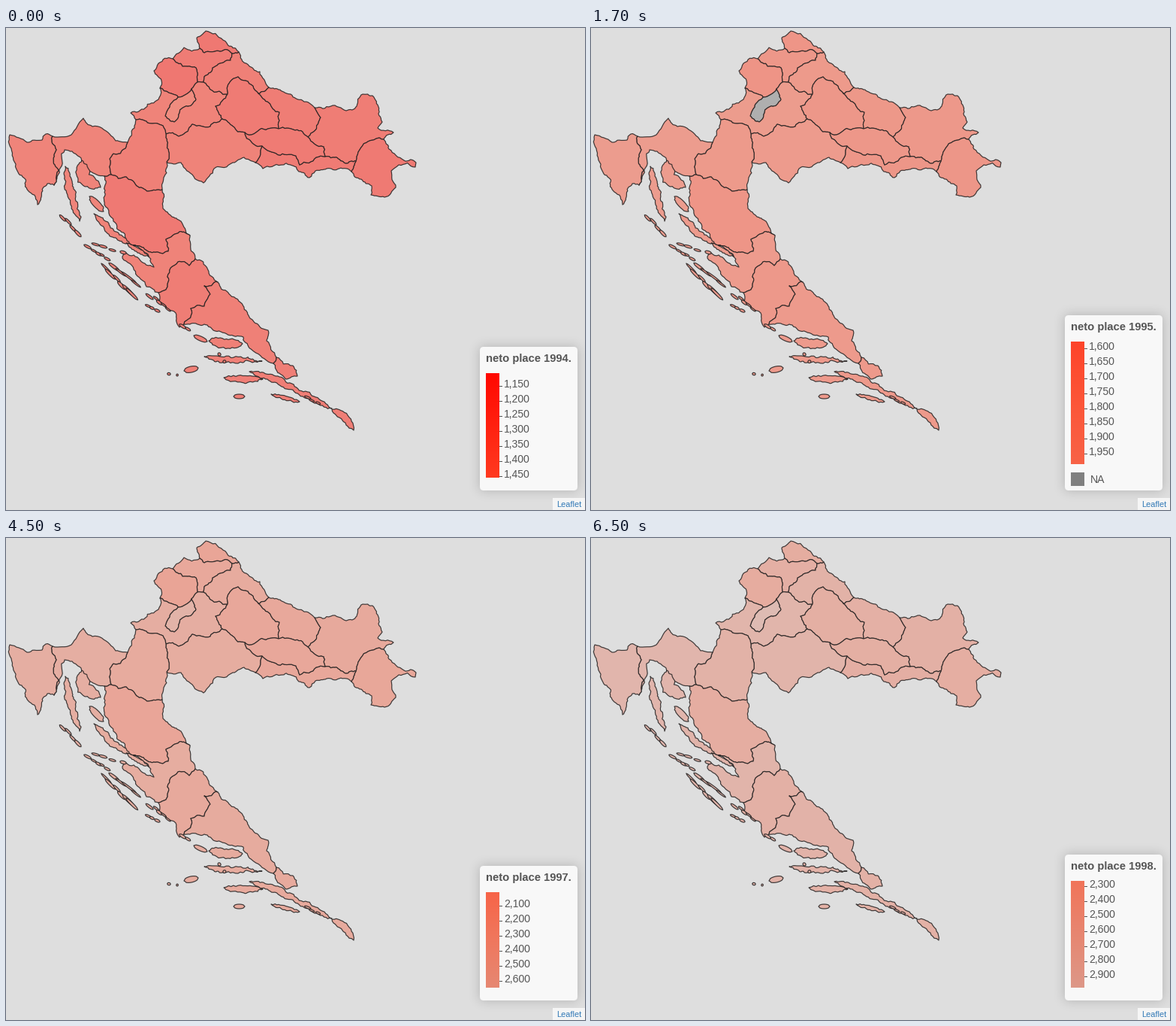
Write a matplotlib script that moves like this. It is 771 px wide and 641 px high and loops after 8 s.

```python
import math

import matplotlib.pyplot as plt
import numpy as np
from matplotlib.animation import FuncAnimation
from matplotlib.patches import FancyBboxPatch, Polygon, Rectangle

W, H, DPI = 771, 641, 128
PX = 72 / DPI  # one pixel in points
BG = np.array([222, 222, 222]) / 255
GRAY = np.array([128, 128, 128]) / 255
INK = "#555555"
EDGE = (0.13, 0.12, 0.12, 0.85)

plt.rcParams["font.family"] = "Liberation Sans"
plt.rcParams["text.kerning_factor"] = 6  # no pair kerning

# Points where county borders meet.
NODES = dict(
    A=(258, 27), B=(301, 34), C=(310, 32), D=(222, 41), E=(255, 72), F=(263, 72), G=(205, 80),
    H=(247, 81), I=(229, 92), J=(350, 79), K=(336, 87), L=(295, 88), M=(288, 121), N=(213, 141),
    O=(173, 122), P=(363, 134), Q=(318, 139), R=(411, 106), S=(402, 145), T=(503, 148),
    U=(466, 177), V=(425, 171), W=(460, 191), X=(332, 179), Y=(341, 157), Z=(214, 178),
    a=(208, 215), b=(140, 195), c=(162, 152), d=(131, 197), e=(64, 209), f=(62, 144),
    g=(245, 276), h=(168, 289), i=(252, 307), j=(203, 352), k=(282, 338), l=(237, 394),
    m=(360, 438), n=(356, 446), o=(388, 463), p=(224, 125), q=(42, 235),
)

# Key bends on the way from one node to the next; other borders run straight.
BENDS = dict(
    AC=[(254, 13), (266, 4), (289, 16)],
    AB=[(264, 33)],
    DA=[(237, 26)],
    BF=[(299, 43), (270, 60)],
    DE=[(235, 51), (253, 53)],
    GD=[(207, 70), (197, 57), (203, 47)],
    Hp=[(253, 95), (231, 113)],
    pI=[(212, 117), (219, 101)],
    CJ=[(314, 42), (338, 58)],
    KL=[(319, 70), (309, 65), (298, 72)],
    LF=[(284, 84)],
    LM=[(279, 104)],
    MN=[(272, 131), (248, 128), (239, 139), (230, 144)],
    NO=[(209, 130)],
    OG=[(166, 113), (203, 95)],
    KP=[(364, 112)],
    JR=[(379, 88)],
    RS=[(419, 119)],
    SP=[(385, 136)],
    RT=[(453, 110), (467, 104), (475, 88), (488, 90), (501, 125), (495, 133), (516, 139)],
    TU=[(489, 149), (469, 165)],
    UV=[(452, 180)],
    VS=[(423, 158)],
    TW=[(510, 161), (530, 176), (546, 179), (545, 185), (523, 182), (513, 190), (519, 212), (504, 225),
        (486, 222), (487, 210)],
    WX=[(427, 187), (412, 190), (404, 199), (390, 191), (342, 187)],
    YV=[(386, 170), (391, 182), (413, 172)],
    YQ=[(327, 152)],
    XZ=[(317, 172), (302, 179), (277, 187), (263, 206), (243, 191), (233, 179)],
    cO=[(171, 133)],
    Za=[(211, 197)],
    ab=[(190, 217), (160, 198)],
    bc=[(138, 174), (143, 167), (159, 160)],
    fc=[(87, 142), (103, 120), (115, 131), (138, 141), (146, 150)],
    de=[(100, 173), (88, 164), (78, 162)],
    ef=[(70, 190), (67, 162)],
    eq=[(55, 207)],
    qf=[(31, 218), (15, 190), (5, 142), (28, 152), (48, 149), (53, 141)],
    ag=[(209, 240), (233, 257)],
    gh=[(231, 271), (213, 281), (216, 297), (201, 298)],
    hd=[(143, 257), (131, 235)],
    ij=[(244, 316), (229, 311), (215, 331), (213, 348)],
    jh=[(187, 344), (155, 306), (160, 299), (197, 318), (190, 304)],
    kl=[(264, 343), (272, 354), (264, 370), (246, 373)],
    lj=[(231, 398), (226, 379), (204, 364)],
    km=[(296, 352), (334, 393), (349, 402), (347, 416)],
    nl=[(316, 411), (276, 402), (268, 395)],
    mo=[(382, 449)],
    on=[(373, 467)],
)

# Ring of nodes for each county and its place between the year's lowest and highest pay.
CITY = "HpI"
COUNTIES = {
    "ACB": 0.2, "DABFE": 0.35, "GDEHI": 0.15, CITY: 1, "GIpHEFLMNO": 0.65, "BCJKLF": 0.5,
    "KPQML": 0.32, "JRSPK": 0.38, "RTUVS": 0.4, "TWU": 0.28, "WXYVU": 0.3, "PSVYQ": 0.32,
    "XZNMQY": 0.62, "cONZab": 0.5, "fcbde": 0.68, "eqf": 0.68, "dbagh": 0.22, "hgij": 0.62,
    "jikl": 0.4, "lkmn": 0.52, "mon": 0.45,
}
KVARNER, ZADAR, SIBENIK, SPLIT, SOUTH = "fcbde", "hgij", "jikl", "lkmn", "mon"

# Large islands: county, width, spine.
ISLANDS = [
    (KVARNER, 18, [(101, 176), (103, 200), (126, 212)]),
    (KVARNER, 10, [(79, 184), (85, 215), (98, 257)]),
    (KVARNER, 9, [(111, 224), (130, 244)]),
    (ZADAR, 9, [(117, 247), (140, 271), (165, 288)]),
    (ZADAR, 5, [(160, 286), (190, 304)]),
    (SPLIT, 6, [(250, 409), (268, 417)]),
    (SPLIT, 13, [(270, 416), (293, 420), (315, 420)]),
    (SPLIT, 7, [(264, 437), (290, 441), (341, 443)]),
    (SPLIT, 8, [(237, 456), (256, 452)]),
    (SOUTH, 9, [(290, 465), (315, 467), (342, 467)]),
    (SOUTH, 9, [(324, 457), (360, 467), (434, 506)]),
    (SOUTH, 10, [(434, 507), (450, 516), (463, 535)]),
    (SOUTH, 6, [(303, 490), (318, 490)]),
    (SOUTH, 5, [(353, 487), (391, 497)]),
]

# Rows of islets: county, count, mean length, both ends of the row.
CHAINS = [
    (KVARNER, 4, 12, (74, 250), (98, 275)),
    (ZADAR, 5, 11, (106, 291), (138, 308)),
    (ZADAR, 6, 19, (128, 315), (172, 359)),
    (ZADAR, 4, 22, (138, 312), (180, 344)),
    (ZADAR, 4, 10, (112, 285), (160, 299)),
    (SIBENIK, 5, 12, (190, 353), (220, 376)),
    (SIBENIK, 3, 10, (184, 368), (206, 378)),
    (SPLIT, 2, 10, (234, 397), (245, 404)),
    (SPLIT, 2, 4, (209, 457), (234, 463)),
    (SPLIT, 2, 6, (283, 432), (295, 447)),
    (SOUTH, 3, 9, (396, 490), (420, 500)),
]

# Pay span and label step per year from 1994.
YEARS = [(1107, 1455, 50), (1577, 1985, 50), (1776, 2258, 50), (2010, 2645, 100), (2265, 2975, 100)]
NO_DATA_YEAR = 1  # the city has no value then
PAY_STOPS = [1107, 1455, 1800, 2300, 2975]
PAY_COLORS = np.array([(255, 8, 0), (255, 58, 32), (252, 87, 58), (240, 118, 92), (221, 152, 136)]) / 255


def pay_color(pay):
    return np.stack([np.interp(pay, PAY_STOPS, channel) for channel in PAY_COLORS.T], axis=-1)


def roughen(points, rng, amount=0.1):
    """Fractal midpoint displacement down to strokes of a few pixels."""
    out = [points[0]]

    def split(a, b):
        dx, dy = b[0] - a[0], b[1] - a[1]
        if math.hypot(dx, dy) < 3.5:
            out.append(b)
            return
        k = np.clip(rng.normal(0, amount), -0.2, 0.2)
        mid = ((a[0] + b[0]) / 2 - k * dy, (a[1] + b[1]) / 2 + k * dx)
        split(a, mid)
        split(mid, b)

    for a, b in zip(points, points[1:]):
        split(a, b)
    return out


def build_borders(rng):
    borders = {}
    for ring in COUNTIES:
        for start, end in zip(ring, ring[1:] + ring[0]):
            if end + start in borders:
                borders[start + end] = borders[end + start][::-1]
                continue
            bends = BENDS.get(start + end) or BENDS.get(end + start, [])[::-1]
            borders[start + end] = roughen([NODES[start], *bends, NODES[end]], rng)
    return borders


def island(spine, width, rng):
    """Outline around a spine, swelling from both tips."""
    spine = np.array(spine, float)
    t = np.linspace(0, 1, 9)
    knots = np.linspace(0, 1, len(spine))
    mid = np.column_stack([np.interp(t, knots, axis) for axis in spine.T])
    along = np.gradient(mid, axis=0)
    along /= np.hypot(*along.T)[:, None]
    side = along[:, ::-1] * (-1, 1) * (width / 2 * np.sin(np.pi * t) ** 0.4)[:, None]
    outline = np.vstack([mid + side, (mid - side)[-2::-1]])
    return roughen([tuple(p) for p in outline], rng, 0.15)


def islet_chain(count, length, start, end, rng):
    start, end = np.array(start), np.array(end)
    along = (end - start) / np.hypot(*(end - start))
    for t in (np.arange(count) + 0.5) / count:
        half = along * length * rng.uniform(0.3, 0.6)
        center = start + (end - start) * t + rng.uniform(-2, 2, 2)
        yield island([center - half, center + half], rng.uniform(2, 4), rng)


def land_shapes():
    rng = np.random.RandomState(4)
    borders = build_borders(rng)
    for ring in COUNTIES:
        edges = [borders[s + e] for s, e in zip(ring, ring[1:] + ring[0])]
        yield ring, np.vstack(edges)
    for county, width, spine in ISLANDS:
        yield county, island(spine, width, rng)
    for county, *chain in CHAINS:
        for outline in islet_chain(*chain, rng):
            yield county, outline


def county_fill(county, year):
    low, high, _ = YEARS[year]
    missing = county == CITY and year == NO_DATA_YEAR
    color = GRAY if missing else pay_color(low + (high - low) * COUNTIES[county])
    return (color + BG) / 2


fig = plt.figure(figsize=(W / DPI, H / DPI), dpi=DPI, facecolor=BG)
ax = fig.add_axes([0, 0, 1, 1])


def label(x, y, text, px, color=INK, weight="normal"):
    return ax.text(x, y, text, fontsize=px * PX, color=color, weight=weight, va="baseline", zorder=6)


def rect(x, y, w, h, color):
    return ax.add_patch(Rectangle((x, y), w, h, fc=color, ec="none", zorder=5))


def picture(pixels, left, right, top, bottom, zorder):
    return ax.imshow(pixels, extent=(left, right, bottom, top), aspect="auto",
                     interpolation="nearest", zorder=zorder)


def blur_profile(n, start, end, sigma=7.5):
    edge = np.vectorize(lambda d: 0.5 * math.erf(d / sigma / math.sqrt(2)))
    x = np.arange(n) + 0.5
    return edge(x - start) - edge(x - end)


def make_legend(year):
    low, high, step = YEARS[year]
    bottom = 580 if year == NO_DATA_YEAR else 598
    height = round((high - low) / step * 20)
    top = bottom - height
    box_top = top - 35

    shadow = np.zeros((H, W, 4))
    shadow[..., 3] = 0.2 * np.outer(blur_profile(H, box_top, 615), blur_profile(W, 631, 761))
    bar = pay_color(np.linspace(low, high, height))[:, None]
    parts = [
        picture(shadow, 0, W, 0, H, 3),
        ax.add_patch(FancyBboxPatch((631, box_top), 130, 615 - box_top, fc="#f8f8f8", ec="none",
                                    zorder=4, boxstyle="round,pad=0,rounding_size=5")),
        picture(bar, 639, 657, top, bottom, 5),
        label(639, box_top + 20, f"neto place {1994 + year}.", 14.7, weight="bold"),
    ]
    for value in range(math.ceil(low / step) * step, high + 1, step):
        y = round(top + (value - low) / step * 20)
        parts += [label(663, y + 2, f"{value:,}", 14), rect(657, y, 4, 1, INK)]
    if year == NO_DATA_YEAR:
        parts += [rect(639, 591, 18, 18, GRAY), label(665, 605, "NA", 14)]
    return parts


land = [(county, ax.add_patch(Polygon(outline, ec=EDGE, lw=1.2 * PX, joinstyle="round", zorder=2)))
        for county, outline in land_shapes()]
legends = [make_legend(year) for year in range(len(YEARS))]

rect(728, 625, 43, 16, "#f5f5f5")
label(733, 637, "Leaflet", 11, "#337ab7")
ax.set(xlim=(0, W), ylim=(H, 0))
ax.axis("off")


def update(n):
    year = (n + 3) // 4  # half-second steps; the first year shows for one
    for county, patch in land:
        patch.set_facecolor(county_fill(county, year))
    for i, parts in enumerate(legends):
        for part in parts:
            part.set_visible(i == year)
    return []


anim = FuncAnimation(fig, update, frames=16, interval=500, repeat=True, repeat_delay=0)
plt.show()
```
